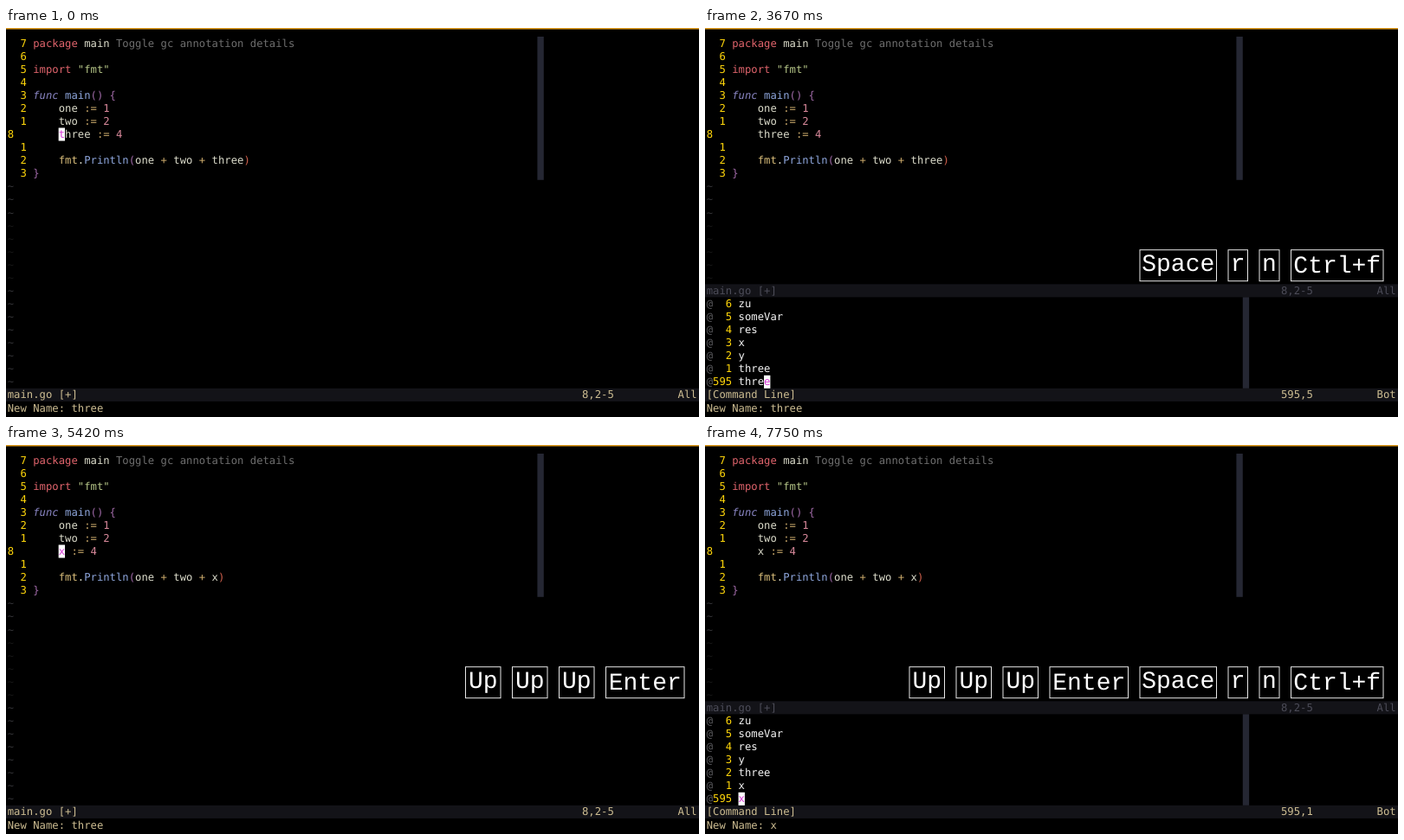
Recreate the animation shown at these times as an HTML page with a canvas. Size 800 by 450 pixels, loop 8 s.

```html
<!DOCTYPE html>
<html lang="en">
<head>
<meta charset="utf-8">
<title>Rename from the command-line window</title>
<style>
  html, body { margin: 0; width: 100%; height: 100%; overflow: hidden; background: #000; }
  canvas { display: block; width: 800px; height: 450px; }
</style>
</head>
<body>
<canvas id="stage"></canvas>
<script>
const LOOP = 8000;
const LEFT = 1.7, TOP = 10, CELL_W = 7.37, CELL_H = 15.07;
const MONO = '12.24px "DejaVu Sans Mono", Menlo, monospace';
const KEY_FONT = '28px "Courier New", "Liberation Mono", monospace';
const C = {
  num: '#ffd60a', red: '#e0646c', text: '#dcdccb', hint: '#6e6e6e', str: '#b9c98a',
  func: '#8a86c4', purple: '#a06aa8', op: '#c9a86a', digit: '#d9899b', pkg: '#dcc07c',
  call: '#8ea6dc', paren: '#d0604c', status: '#cdbd92', dim: '#4c4c58', at: '#5a5a5e',
  bar: '#131318', column: '#252733', white: '#f4f4f4', cursor: '#d63ad6'
};

const canvas = document.getElementById('stage');
const ctx = canvas.getContext('2d');
const scale = window.devicePixelRatio || 1;
canvas.width = 800 * scale;
canvas.height = 450 * scale;

// Changes of the editor state, in order of time.
const steps = [
  [0, { name: 'three', prompt: 'three', win: null, line: 595, cursor: 'code', since: 0, cmd: '', keys: '' }],
  [1000, { cmd: '<20>' }],
  [1080, { keys: 'Space' }],
  [1170, { cmd: '<20>r' }],
  [1210, { keys: 'Space r' }],
  [1290, { cmd: '', cursor: 'prompt', since: 1290 }],
  [1330, { keys: 'Space r n' }],
  [2040, { keys: 'Space r n Ctrl+f' }],
  [2170, { win: ['zu', 'someVar', 'res', 'x', 'y', 'three', 'three'], cursor: 'win', since: 2170 }],
  [4000, { keys: '' }],
  [4630, { line: 594, since: 4630 }],
  [4710, { keys: 'Up' }],
  [4830, { line: 593, since: 4830 }],
  [4920, { keys: 'Up Up' }],
  [5040, { line: 592, since: 5040 }],
  [5120, { keys: 'Up Up Up' }],
  [5290, { win: null, cursor: 'code', since: 5330 }],
  [5330, { name: 'x' }],
  [5370, { keys: 'Up Up Up Enter' }],
  [6040, { cmd: '<20>', since: 6040 }],
  [6130, { keys: 'Up Up Up Enter Space' }],
  [6210, { cmd: '<20>r' }],
  [6290, { keys: 'Up Up Up Enter Space r' }],
  [6330, { cmd: '', prompt: 'x', cursor: 'prompt', since: 6330 }],
  [6420, { keys: 'Up Up Up Enter Space r n' }],
  [7420, { keys: 'Up Up Up Enter Space r n Ctrl+f' }],
  [7540, { win: ['zu', 'someVar', 'res', 'y', 'three', 'x', 'x'], line: 595, cursor: 'win', since: 7540 }]
];

const stateAt = t => Object.assign({}, ...steps.filter(s => s[0] <= t).map(s => s[1]));
const colX = col => LEFT + col * CELL_W;
const rowY = row => TOP + row * CELL_H;

function box(x, y, w, h, color) {
  ctx.fillStyle = color;
  ctx.fillRect(x, y, w, h);
}

function put(row, col, text, color, style = '') {
  ctx.font = style + ' ' + MONO;
  ctx.fillStyle = color;
  [...text].forEach((ch, i) => {
    if (ch !== ' ') ctx.fillText(ch, colX(col + i), rowY(row) + 11.6);
  });
}

// Parts alternate text and colour name.
function runs(row, col, parts) {
  for (let i = 0; i < parts.length; i += 2) {
    put(row, col, parts[i], C[parts[i + 1]], parts[i + 1] === 'func' ? 'italic' : '');
    col += parts[i].length;
  }
}

function block(row, col, ch) {
  box(colX(col), rowY(row), CELL_W, CELL_H, '#fff');
  put(row, col, ch, C.cursor);
}

function statusLine(row, title, ruler, place, color) {
  box(0, rowY(row), 800, CELL_H, C.bar);
  put(row, 0, title, color);
  put(row, 90, ruler, color);
  put(row, 105, place, color);
}

function drawCode(name) {
  const rows = [
    ['package', 'red', ' main ', 'text', 'Toggle gc annotation details', 'hint'],
    [],
    ['import ', 'red', '"fmt"', 'str'],
    [],
    ['func', 'func', ' main', 'call', '()', 'purple', ' {', 'purple'],
    ['    one ', 'text', ':= ', 'op', '1', 'digit'],
    ['    two ', 'text', ':= ', 'op', '2', 'digit'],
    ['    ' + name + ' ', 'text', ':= ', 'op', '4', 'digit'],
    [],
    ['    fmt', 'pkg', '.', 'text', 'Println', 'call', '(', 'purple', 'one ', 'text', '+', 'op',
      ' two ', 'text', '+ ', 'op', name, 'text', ')', 'paren'],
    ['}', 'purple']
  ];
  box(colX(83), TOP, CELL_W, 11 * CELL_H, C.column);
  rows.forEach((parts, row) => {
    if (row === 7) put(row, 0, '8', C.num);
    else put(row, 2, String(Math.abs(row - 7)), C.num);
    runs(row, 4, parts);
  });
}

function drawTildes(end) {
  for (let row = 11; row < end; row++) {
    put(row, 0, '~', row > 13 && row < 19 ? '#161616' : '#333336');
  }
}

function drawWindow(s) {
  const current = s.line - 589;
  box(colX(84), rowY(20), CELL_W, 7 * CELL_H, C.column);
  s.win.forEach((text, i) => {
    const label = i === current ? s.line : Math.abs(i - current);
    put(20 + i, 0, '@', C.at);
    put(20 + i, 1, String(label).padStart(3), C.num);
    put(20 + i, 5, text, C.white);
  });
}

// Column of the cursor inside the command-line window, counted from 0.
function winColumn(s) {
  return Math.min(4, s.win[s.line - 589].length - 1);
}

function drawCursor(s, t) {
  if (Math.floor((t - s.since) / 750) % 2 && s.cursor !== 'code') return;
  if (s.cursor === 'code') block(7, 8, s.name[0]);
  else if (s.cursor === 'prompt') block(28, 10 + s.prompt.length, ' ');
  else {
    const col = winColumn(s);
    block(s.line - 569, 5 + col, s.win[s.line - 589][col]);
  }
}

const keyWidth = { Up: 40.5, Space: 88.5, Enter: 90.5, r: 22.5, n: 23, 'Ctrl+f': 106.5 };

function drawKeys(keys) {
  if (!keys) return;
  let right = 783;
  ctx.font = KEY_FONT;
  ctx.lineWidth = 1;
  ctx.strokeStyle = '#e8e8e8';
  for (const key of keys.split(' ').reverse()) {
    const w = keyWidth[key], x = right - w;
    const low = key === 'Enter' || key === 'Ctrl+f';
    ctx.strokeRect(x, 256.7, w, 36);
    ctx.fillStyle = '#fff';
    ctx.fillText(key, x + (w - ctx.measureText(key).width) / 2, low ? 283 : 280.5);
    right = x - 13.5;
  }
}

function draw(t) {
  const s = stateAt(t);
  ctx.setTransform(scale, 0, 0, scale, 0, 0);
  ctx.textRendering = 'geometricPrecision';
  box(0, 0, 800, 450, '#000');
  box(0, 0, 800, 1.5, '#dd9a1c');
  drawCode(s.name);
  drawTildes(s.win ? 19 : 27);
  if (s.win) {
    statusLine(19, 'main.go [+]', '8,2-5', 'All', C.dim);
    drawWindow(s);
    statusLine(27, '[Command Line]', s.line + ',' + (winColumn(s) + 1), 'Bot', C.status);
  } else {
    statusLine(27, 'main.go [+]', '8,2-5', 'All', C.status);
  }
  put(28, 0, 'New Name: ' + s.prompt, C.status);
  put(28, 97, s.cmd, C.status);
  drawCursor(s, t);
  drawKeys(s.keys);
}

const start = performance.now();
function tick() {
  draw((performance.now() - start) % LOOP);
  requestAnimationFrame(tick);
}
tick();
</script>
</body>
</html>
```
